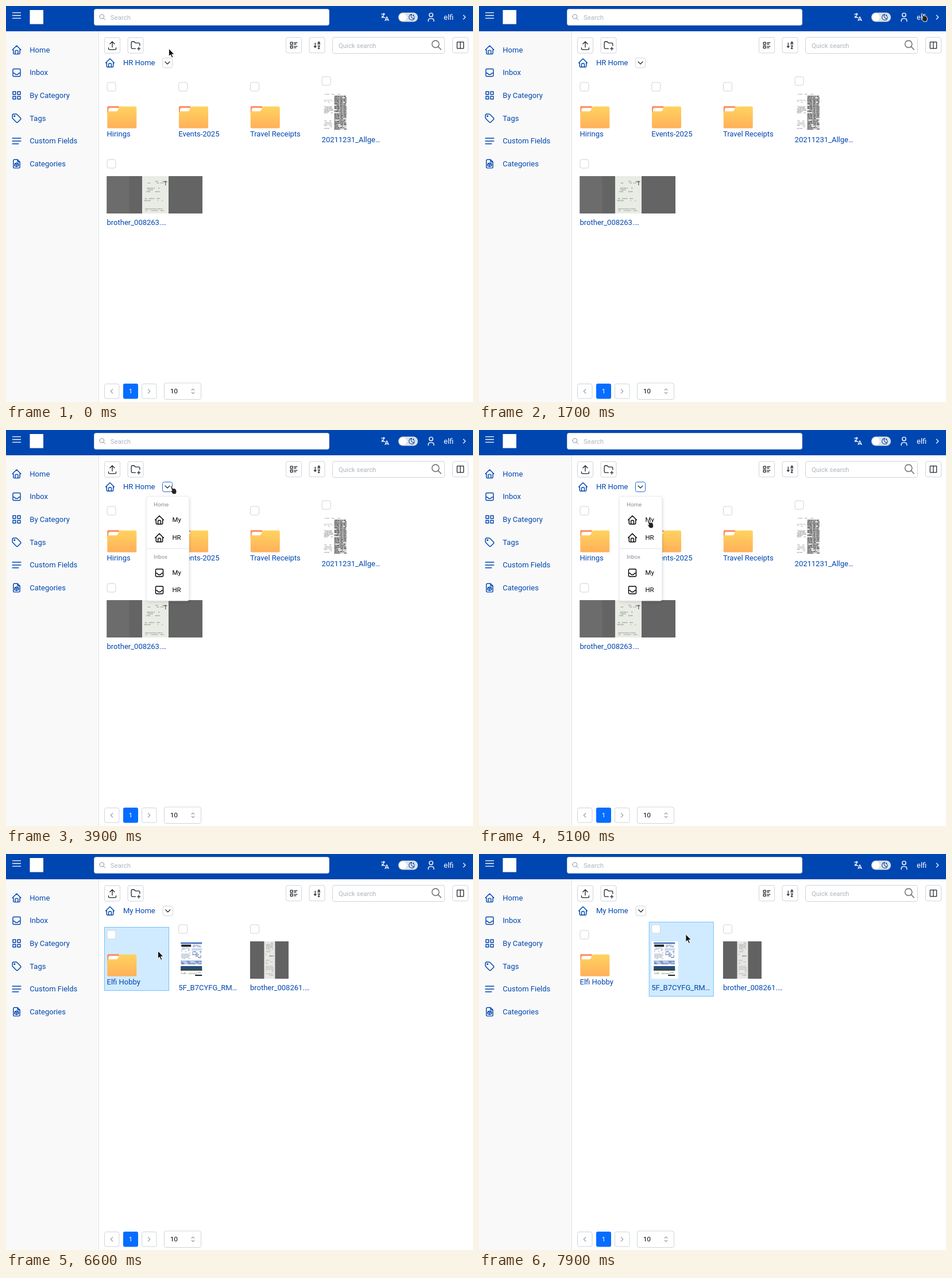
Recreate the animation shown at these times as an HTML page. Size 813 px wide and 689 px high, loop 8000 ms.

```html
<!DOCTYPE html>
<html lang="en">
<head>
<meta charset="utf-8">
<title>Document browser</title>
<style>
  html, body { margin: 0; width: 100%; height: 100%; overflow: hidden; background: #fff; }
  svg { display: block; font: 13px Roboto, sans-serif; }
  .icon { fill: none; stroke: currentColor; stroke-linecap: round; stroke-linejoin: round; }
  .box { fill: #fff; stroke: #ced4da; }
  .link { fill: #0046b0; }
  .small { font-size: 11.375px; }
  .label { font-size: 9.75px; fill: #868e96; }
  .hover { fill: #d0ebff; stroke: #74c0fc; }
</style>
</head>
<body>
<svg id="stage" width="813" height="689" viewBox="0 0 813 689"></svg>
<script>
const LOOP = 8000, STEP = 100;
const BLUE = '#0046b0', INK = '#212529';

const ICONS = {
  home: 'M5 12H3l9-9 9 9h-2M5 12v7a2 2 0 0 0 2 2h10a2 2 0 0 0 2-2v-7M9 21v-6a2 2 0 0 1 2-2h2a2 2 0 0 1 2 2v6',
  inbox: 'M4 6a2 2 0 0 1 2-2h12a2 2 0 0 1 2 2v12a2 2 0 0 1-2 2H6a2 2 0 0 1-2-2zM4 13h3l3 3h4l3-3h3',
  grid: 'M4 4h6v6H4zM14 4h6v6h-6zM4 14h6v6H4zM14 14h6v6h-6z',
  tag: 'M6.5 7.5a1 1 0 1 0 2 0a1 1 0 1 0-2 0M3 6v5.172a2 2 0 0 0 .586 1.414l7.71 7.71a2.41 2.41 0 0 0 3.408 0l5.592-5.592a2.41 2.41 0 0 0 0-3.408l-7.71-7.71A2 2 0 0 0 11.172 3H6a3 3 0 0 0-3 3z',
  lines: 'M3 6h18M3 12h18M3 18h13',
  cube: 'M14 3v4a1 1 0 0 0 1 1h4M17 21H7a2 2 0 0 1-2-2V5a2 2 0 0 1 2-2h7l5 5v11a2 2 0 0 1-2 2zM12 13.5l4-1.5M8 11.846l4 1.654V18l4-1.846v-4.308L12 10zM8 12v4.2l4 1.8',
  upload: 'M4 17v2a2 2 0 0 0 2 2h12a2 2 0 0 0 2-2v-2M7 9l5-5 5 5M12 4v12',
  folderPlus: 'M12 19H5a2 2 0 0 1-2-2V6a2 2 0 0 1 2-2h4l3 3h7a2 2 0 0 1 2 2v3.5M16 19h6M19 16v6',
  details: 'M13 5h8M13 9h5M13 15h8M13 19h5M3 4h6v6H3zM3 14h6v6H3z',
  sort: 'M15 10V5c0-1.38.62-2 2-2s2 .62 2 2v5m0-3h-4M19 21h-4l4-7h-4M4 15l3 3 3-3M7 6v12',
  columns: 'M5 4h14a1 1 0 0 1 1 1v14a1 1 0 0 1-1 1H5a1 1 0 0 1-1-1V5a1 1 0 0 1 1-1zM12 4v16',
  search: 'M3 10a7 7 0 1 0 14 0a7 7 0 1 0-14 0M21 21l-6-6',
  down: 'M6 9l6 6 6-6', left: 'M15 6l-6 6 6 6', right: 'M9 6l6 6-6 6',
  selector: 'M8 9l4-4 4 4M16 15l-4 4-4-4',
  language: 'M4 5h7M9 3v2c0 4.418-2.239 8-5 8M5 9c0 2.144 2.952 3.908 6.7 4M12 20l4-9 4 9M19.1 18h-6.2',
  user: 'M8 7a4 4 0 1 0 8 0a4 4 0 0 0-8 0M6 21v-2a4 4 0 0 1 4-4h4a4 4 0 0 1 4 4v2',
  moon: 'M12 3h.393a7.5 7.5 0 0 0 7.92 12.446A9 9 0 1 1 12 3zM17 4a2 2 0 0 0 2 2a2 2 0 0 0-2 2a2 2 0 0 0-2-2a2 2 0 0 0 2-2M19 11h2m-1-1v2',
};

// Icons are placed by their centre.
const icon = (name, x, y, color = INK, size = 19.5, weight = 1.8) =>
  `<path class="icon" color="${color}" stroke-width="${weight}" d="${ICONS[name]}"
    transform="translate(${x - size / 2} ${y - size / 2}) scale(${size / 24})"/>`;
const text = (x, y, value, attrs = 'class="link"') => `<text x="${x}" y="${y}" ${attrs}>${value}</text>`;
const rect = (x, y, w, h, fill, rx = 0) =>
  `<rect x="${x}" y="${y}" width="${w}" height="${h}" rx="${rx}" fill="${fill}"/>`;
const box = (x, y, w, h, attrs = '', rx = 3) =>
  `<rect class="box" x="${x}" y="${y}" width="${w}" height="${h}" rx="${rx}" ${attrs}/>`;
const button = (name, x, y, size = 19.5, weight = 1.6) =>
  box(x - 13.5, y - 13.5, 27, 27, `id="${name}"`) + icon(name, x, y, INK, size, weight);

function seeded(seed) {
  return () => (seed = seed * 16807 % 2147483647) / 2147483647;
}

// Rows of tiny dashes that read as a block of print.
function print(x, y, w, h, gap, color, seed, density = .7) {
  const random = seeded(seed);
  let d = '';
  for (let row = y; row < y + h; row += gap) {
    for (let col = x; col < x + w - 1; ) {
      const length = Math.min(1 + random() * 5, x + w - col);
      if (random() < density) d += `M${col.toFixed(1)} ${row.toFixed(1)}h${length.toFixed(1)}`;
      col += length + .6;
    }
  }
  return `<path d="${d}" stroke="${color}" stroke-width="${gap * .55}"/>`;
}

const folder = (x, y) => `<g transform="translate(${x} ${y})">
  <path d="M2 0H19Q21 0 21 2V14H0V2Q0 0 2 0Z" fill="#ff8a5b"/>
  <path d="M5 3H21V11H2V6Q2 3 5 3Z" fill="#fff"/>
  <path d="M0 11Q0 9 2 9H15Q18 9 19 6L20 3Q21 .5 24 .5H49Q51 .5 51 3V36Q51 38.5 49 38.5H2.5Q0 38.5 0 36Z" fill="url(#folder)"/>
</g>`;

const reportThumb = (x, y) => rect(x, y, 46.5, 65, '#fff')
  + print(x + 4, y + 1.5, 32, 2, 2, '#aaa', 7, .6)
  + print(x + 4, y + 12, 15, 5, 2, '#bbb', 11, .5)
  + print(x + 4, y + 23, 16, 11, 2.2, '#999', 23, .65)
  + print(x + 4, y + 48, 14, 14, 2.6, '#bbb', 31, .45)
  + rect(x + 22, y + 4, 21, 59, '#d4d4d4')
  + print(x + 22, y + 5, 21, 58, 2.6, '#3a3a3a', 43, .8)
  + rect(x + 31, y + 4, .7, 59, '#eee') + rect(x + 37, y + 4, .7, 59, '#eee');

const ticketThumb = (x, y) => rect(x, y, 46.5, 65, '#fff')
  + rect(x + 4, y + 2, 37, 2, '#2758b0') + rect(x + 5, y + 5.5, 17, 4, '#1e2836')
  + print(x + 25, y + 6, 15, 5, 1.8, '#7187b4', 3)
  + print(x + 5, y + 12, 16, 20, 2, '#9aa4ba', 5, .6)
  + rect(x + 23, y + 12, 18, 4, '#c9d8f0') + print(x + 24, y + 18, 16, 14, 2.5, '#6683b5', 9, .65)
  + rect(x + 4, y + 33, 37, 7, '#b7c9e6') + print(x + 5, y + 35, 35, 5, 2, '#3c5d9c', 17, .6)
  + rect(x + 4, y + 43, 37, 8, '#244d83') + rect(x + 4, y + 48, 37, 3, '#394b38')
  + print(x + 5, y + 54, 34, 3, 2, '#819172', 19, .6) + rect(x + 29, y + 58, 12, 2, '#161f2b');

const scanThumb = (x, y) => rect(x, y, 166.5, 65, '#646464') + rect(x, y, 39, 65, '#6c6c6c')
  + rect(x + 61.5, y, 46, 65, '#e9ece5')
  + `<g filter="url(#blur)">${print(x + 66, y + 9, 34, 6, 3, '#aeb1a9', 13)}
     ${print(x + 65, y + 21, 27, 7, 3, '#a4a8a0', 15)}${print(x + 65, y + 39, 34, 4, 3.5, '#b4b7b0', 27, .5)}
     ${print(x + 65, y + 57, 36, 6, 3, '#b0b3ab', 29)}</g>`
  + rect(x + 99, y + 9, 6, 1.5, '#666') + rect(x + 101.5, y + 8, 1.5, 8, '#777');

const receiptThumb = (x, y) => rect(x, y, 67, 65, '#626262') + rect(x + 24.5, y, 19, 65, '#e7e7e5')
  + print(x + 28, y + 3, 12, 17, 2.5, '#b5b5b3', 37, .6)
  + print(x + 27, y + 23, 14, 5, 2.5, '#888', 41, .7)
  + print(x + 27, y + 33, 14, 28, 2.6, '#bcbcb9', 47, .6);

const columnX = i => 171.5 + 124.7 * i;
const checkbox = (x, y) => box(x + 4.5, y, 15, 15);
const highlight = (i, y, h) =>
  `<rect class="hover" data-tile="${i}" x="${columnX(i)}" y="${y}" width="112" height="${h}"/>`;

const folderTile = (i, name) => highlight(i, 127.5, 110) + checkbox(columnX(i), 133)
  + folder(columnX(i) + 4.8, 174.3) + text(columnX(i) + 4, 227, name);
const fileTile = (i, name, thumb) => highlight(i, 118.5, 129) + checkbox(columnX(i), 123)
  + thumb(columnX(i) + 4, 152) + text(columnX(i) + 4, 237, name);

const sidebar = [['home', 'Home'], ['inbox', 'Inbox'], ['grid', 'By Category'], ['tag', 'Tags'],
  ['lines', 'Custom Fields'], ['cube', 'Categories']]
  .map(([name, label], i) => icon(name, 18.5, 76.3 + 39.65 * i, BLUE)
    + text(41.3, Math.round(80.8 + 39.65 * i), label)).join('');

const header = rect(0, 0, 813, 44, BLUE)
  + '<path d="M11 11.6h15M11 16.5h15M11 21.4h15" stroke="#fff" stroke-width="1.4"/>'
  + rect(41.5, 7, 23.5, 24.5, '#fff') + box(153.5, 5.5, 409, 28)
  + icon('search', 168, 19.5, '#868e96', 13) + text(182, 23.5, 'Search', 'class="small" fill="#adb5bd"')
  + icon('language', 660, 19.5, '#fff', 18) + rect(683, 11.5, 34, 16, '#dee2e6', 8)
  + '<circle cx="691" cy="19.5" r="6.5" fill="#fff"/>' + icon('moon', 706.5, 19.5, BLUE, 13, 2)
  + icon('user', 740, 19.5, '#fff', 19) + text(762, 24, 'elfi', 'fill="#fff"') + icon('right', 798, 19.5, '#fff', 14, 2);

const toolbar = button('upload', 185, 68.5) + button('folderPlus', 225.5, 68.5) + button('details', 501, 68.2, 15.5, 2)
  + button('sort', 541.5, 68.2, 15.5, 2) + button('columns', 791, 68.2, 17, 1.8) + box(568.5, 54.5, 195, 28)
  + text(579, 72.5, 'Quick search', 'class="small" fill="#adb5bd"') + icon('search', 749.5, 68, '#777', 21)
  + icon('home', 181, 99, BLUE) + text(204, 103, 'HR Home', 'id="crumb" class="link"')
  + `<g id="dropdown">${box(272.5, 90.5, 17, 17, 'id="dropdownBox"')}${icon('down', 281, 99, INK, 16)}</g>`
  + '<path id="spinner" d="M312 90.5a8.5 8.5 0 1 1-8.5 8.5" fill="none" stroke="#228be6" stroke-width="2" stroke-linecap="round"/>';

const pager = box(171.5, 657.5, 25.5, 25.5) + icon('left', 184, 670.3, '#868e96', 14)
  + rect(204, 657, 26, 26.5, '#056dff', 3) + text(217, 674, '1', 'class="small" fill="#fff" text-anchor="middle"')
  + box(236.5, 657.5, 25.5, 25.5) + icon('right', 249, 670.3, '#868e96', 14)
  + box(275.5, 656, 64, 28.5) + text(286, 674, '10', 'class="small"') + icon('selector', 325.5, 670.3, '#868e96', 14);

const menuItem = (name, label, y) => icon(name, 267, y + .5, '#000') + text(289.5, y + 4, label, 'class="small"');
const menu = `<g id="menu">
  <rect x="244.5" y="115.5" width="74" height="181.5" rx="3" fill="#fff" stroke="#e9ecef" filter="url(#shadow)"/>
  <rect id="pressed" x="247" y="141" width="69" height="31" rx="3" fill="#f1f3f5"/>
  ${text(257, 133, 'Home', 'class="label"')}${menuItem('home', 'My', 156)}${menuItem('home', 'HR', 187)}
  <path d="M245 206.5h73" stroke="#e3e6ea"/>
  ${text(257, 224, 'Inbox', 'class="label"')}${menuItem('inbox', 'My', 248)}${menuItem('inbox', 'HR', 278)}
</g>`;

const cursor = `<g id="cursor" stroke="#fff" stroke-width=".9" stroke-linejoin="round">
  <path id="arrow" fill="#111" d="M-.6 0V13.5L2.4 10.8 4.7 16 6.9 15 4.7 10H8.9Z"/>
  <path id="hand" fill="#222" d="M.5 1.3Q1.8-.6 2.8 1.3L4.4 5Q5 4 6.2 4.8 7 4 8 5.2 9.2 4.8 9.8 6.2L11 9.5Q11 12 10 13.3V14.5H4.5L1 9.7Q.6 8 2.2 8.4L3 9Z"/>
</g>`;

const stage = document.getElementById('stage');
stage.innerHTML = `<defs>
    <linearGradient id="folder" x2="0" y2="1"><stop stop-color="#ffd35f"/><stop offset="1" stop-color="#ffb05a"/></linearGradient>
    <filter id="blur"><feGaussianBlur stdDeviation=".7"/></filter>
    <filter id="shadow" x="-20%" y="-10%" width="140%" height="120%"><feDropShadow dx="1" dy="2" stdDeviation="2.5" flood-opacity=".13"/></filter>
  </defs>
  ${rect(0, 44, 161, 645, '#f9f9f9')}${rect(161, 44, 1, 645, '#dee2e6')}
  ${header}${sidebar}${toolbar}${pager}
  <g id="teamFiles">
    ${folderTile(0, 'Hirings')}${folderTile(1, 'Events-2025')}${folderTile(2, 'Travel Receipts')}
    ${fileTile(3, '20211231_Allge…', reportThumb)}
    ${checkbox(171.5, 267)}${scanThumb(175.5, 296)}${text(175.5, 381, 'brother_008263.…')}
  </g>
  <g id="ownFiles">
    ${folderTile(0, 'Elfi Hobby')}${fileTile(1, '5F_B7CYFG_RM…', ticketThumb)}${fileTile(2, 'brother_008261.…', receiptThumb)}
  </g>
  ${menu}${cursor}`;

const $ = id => document.getElementById(id);
const show = (element, visible) => element.style.display = visible ? '' : 'none';

// Pointer path: time, x, y and what lies under the pointer (a number is a tile).
const PATH = [
  [0, 284, 74], [100, 300, 84], [200, 362, 108], [300, 455, 121], [400, 560, 132, 3], [500, 642, 126, 3],
  [600, 718, 104], [700, 768, 84], [800, 788, 64, 'columns'], [900, 778, 29], [1000, 772, 19, 'user'],
  [1300, 761, 14, 'user'], [1700, 769.5, 12.5, 'user'], [1800, 770, 13, 'user'], [2000, 782, 40],
  [2200, 770, 52], [2400, 741, 56], [2500, 741, 56], [2600, 470, 138, 2], [2700, 236, 146, 0],
  [2800, 234, 122, 0], [2900, 246, 110], [3200, 276, 98, 'dropdown'], [3900, 286, 97, 'dropdown'],
  [4000, 286, 97, 'dropdown'], [4200, 274, 116], [4400, 262, 134], [4500, 272, 146, 'item'],
  [4800, 292, 156, 'item'], [5000, 292, 156, 'item'], [5400, 295, 157, 'item'], [6000, 295, 157, 'item'],
  [6100, 292, 159], [6400, 278, 165, 0], [6800, 252, 172, 0], [6900, 258, 170, 0], [7000, 312, 166, 1],
  [7100, 392, 165, 1], [7200, 421, 167.5], [7400, 412, 180], [7500, 398, 192, 1], [7700, 375, 205, 1],
  [7900, 360.5, 139.5, 1], [8000, 360.5, 139.5, 1],
];
const HAND = ['user', 'dropdown', 'item'];
const clamp = value => Math.max(0, Math.min(1, value));

function pointerAt(t) {
  const next = PATH.findIndex(key => key[0] > t);
  const [t0, x0, y0, target] = PATH[next - 1], [t1, x1, y1] = PATH[next];
  const k = (t - t0) / (t1 - t0);
  return { x: x0 + (x1 - x0) * k, y: y0 + (y1 - y0) * k, target };
}

function render(t) {
  const { x, y, target } = pointerAt(t);
  const hand = HAND.includes(target);
  $('cursor').setAttribute('transform', `translate(${x} ${y})`);
  show($('hand'), hand);
  show($('arrow'), !hand);

  const own = t >= 6200;
  show($('teamFiles'), !own);
  show($('ownFiles'), own);
  $('crumb').textContent = own ? 'My Home' : 'HR Home';
  $('dropdown').setAttribute('transform', `translate(${own ? .8 : 0} 0)`);
  for (const tile of stage.querySelectorAll('[data-tile]')) show(tile, Number(tile.dataset.tile) === target);
  $('columns').style.fill = target === 'columns' ? '#f1f3f5' : '';

  $('menu').setAttribute('opacity', clamp((t - 3450) / 150) * clamp((6050 - t) / 150));
  $('dropdownBox').style.stroke = t >= 3500 && t < 6000 ? '#1c6ddb' : '';
  show($('pressed'), t >= 5800 && t < 6000);

  show($('spinner'), t >= 6000 && t < 6300);
  $('spinner').setAttribute('transform', `rotate(${(t - 6000) * .3} 312 99)`);
}

const start = performance.now();
function tick() {
  const t = (performance.now() - start) % LOOP;
  render(Math.floor(t / STEP) * STEP);
  requestAnimationFrame(tick);
}
tick();
</script>
</body>
</html>
```
